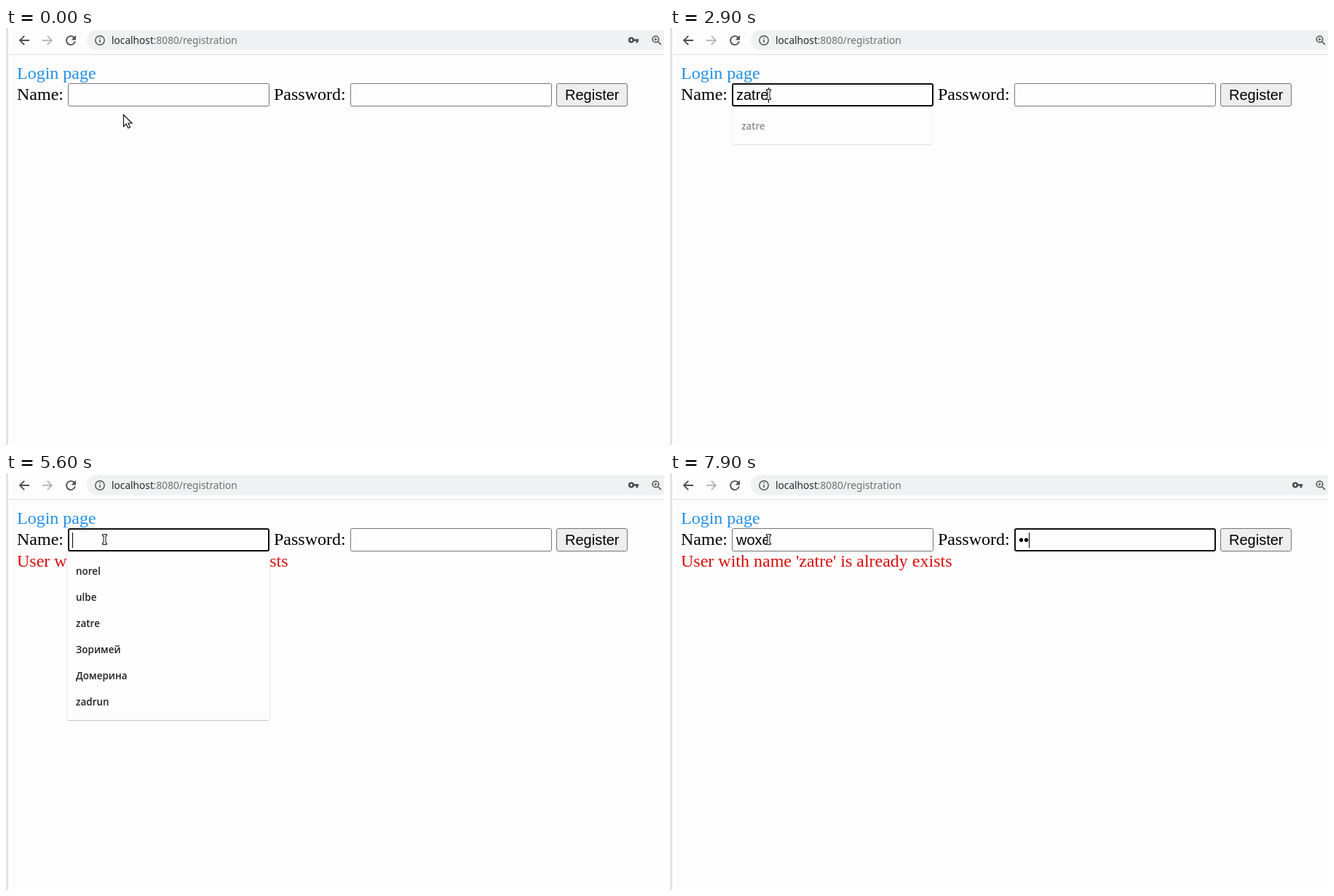
Recreate the animation shown at these times as an HTML page. Size 904 px wide and 574 px high, loop 8000 ms.

```html
<!DOCTYPE html>
<html lang="en">
<head>
<meta charset="utf-8">
<title>Registration form</title>
<style>
  html, body { margin: 0; width: 100%; height: 100%; overflow: hidden; background: #fdfdfd; }
  svg { display: block; width: 904px; height: 574px; }
  .serif { font: 24px "Liberation Serif", serif; }
  .sans { font: 20px "Liberation Sans", sans-serif; }
  .ui { font: 13.7px "Noto Sans", sans-serif; }
  .item { font: 600 13.5px "Open Sans", sans-serif; fill: #222224; }
  .icon { fill: none; stroke: #4f5054; stroke-width: 1.9; }
  .field { fill: #fdfdfd; stroke: #76767a; stroke-width: 1; }
  .field.on { stroke: #101010; stroke-width: 2; }
</style>
</head>
<body>
<svg viewBox="0 0 904 574">
  <rect width="904" height="574" fill="#fdfdfd"/>
  <rect width="3" height="574" fill="#e2e2e2"/>

  <!-- toolbar -->
  <rect x="3" y="36" width="901" height="1" fill="#dedee0"/>
  <rect x="111" y="3" width="820" height="27.5" rx="13.75" fill="#f0f1f2"/>
  <path class="icon" d="M32 17H19.5M25.2 10.8 19 17l6.2 6.2"/>
  <path class="icon" style="stroke:#b8b9bb" d="M50 17h12.5M56.8 10.8 63 17l-6.2 6.2"/>
  <path class="icon" d="M93.6 13.2A6 6 0 1 0 94.9 18.4"/>
  <path d="M96 10v6.4h-6.4z" fill="#4f5054"/>
  <circle class="icon" cx="129" cy="17" r="6.2" style="stroke-width:1.4"/>
  <path class="icon" style="stroke-width:1.5" d="M129 16v4.3M129 13.2v1.6"/>
  <text class="ui" x="145" y="22" fill="#6e7074"><tspan fill="#28292c">localhost</tspan>:8080/registration</text>
  <g id="key">
    <circle class="icon" cx="859" cy="16.6" r="2.8" style="stroke-width:2.6"/>
    <path d="M862 15.3h7.3v2.6h-1v2.6h-2.7v-2.6H862z" fill="#4f5054"/>
  </g>
  <circle class="icon" cx="892.5" cy="15.5" r="4.3" style="stroke-width:1.5"/>
  <path class="icon" style="stroke-width:1.6" d="M895.7 18.7 900 23"/>
  <path class="icon" style="stroke-width:1" d="M890.3 15.5h4.4M892.5 13.3v4.4"/>

  <!-- form -->
  <g class="serif">
    <text x="15" y="70" fill="#2490e8">Login page</text>
    <text x="15" y="99">Name:</text>
    <text x="368" y="99">Password:</text>
    <text id="error" x="15" y="129" fill="#d80c0c">User with name 'zatre' is already exists</text>
  </g>
  <rect id="nameBox" class="field" y="76.5" height="31" rx="2"/>
  <rect id="passBox" class="field" y="76.5" height="31" rx="2"/>
  <text id="nameText" class="sans" x="91" y="99"></text>
  <text id="passText" class="sans" x="479" y="99"></text>
  <rect id="caret" y="82" width="1" height="21"/>
  <rect x="756.5" y="76.5" width="97" height="31" rx="2.5" fill="#eeeeef" stroke="#76767a"/>
  <text class="sans" x="768" y="99">Register</text>

  <!-- suggestions -->
  <g id="popup">
    <rect id="sheet" x="83.5" y="108.5" width="279" fill="#fdfdfd" stroke="#e9e9ea"/>
    <rect id="edge" x="85" width="276" height="1" fill="#c6c6c8"/>
    <g id="items"></g>
  </g>

  <!-- pointers -->
  <path id="arrow" d="M.5.5v16l3.7-3.5 2.5 5.8 2.8-1.2-2.5-5.6h5z" fill="#fff" stroke="#111" stroke-width="1.2"/>
  <path id="beam" d="M-2.5-6.5h6v2h-1.5v10h1.5v2h-6v-2h1.5v-10h-1.5z" fill="#fff" stroke="#111"/>
</svg>

<script>
const LOOP = 8000, STEP = 100, BLINK = 500;
const NAMES = ['norel', 'ulbe', 'zatre', 'Зоримей', 'Домерина', 'zadrun'];
const $ = id => document.getElementById(id);
const set = (id, attrs) => {
  for (const k in attrs) $(id).setAttribute(k, attrs[k]);
};
const show = (id, on) => set(id, { visibility: on ? 'visible' : 'hidden' });

// Each entry changes part of the form at its time in ms.
const EVENTS = [
  [0, { name: '', pass: '', focus: '', key: true, error: false, fade: 0 }],
  [800, { focus: 'name' }],
  [900, { fade: .5 }],
  [1000, { fade: 1 }],
  [1900, { name: 'z', key: false }],
  [2100, { name: 'za' }],
  [2300, { name: 'zat' }],
  [2500, { name: 'zatr' }],
  [2700, { name: 'zatre' }],
  [2900, { fade: .5 }],
  [3000, { fade: 0 }],
  [3100, { focus: 'pass', key: true }],
  [3200, { pass: '•' }],
  [3300, { pass: '••' }],
  [3500, { pass: '•••' }],
  [3600, { pass: '••••' }],
  [3800, { name: '', pass: '', focus: '', error: true }],
  [5300, { focus: 'name' }],
  [5400, { fade: .5 }],
  [5500, { fade: 1 }],
  [5900, { name: 'w', key: false }],
  [6100, { name: 'wo' }],
  [6300, { name: 'wox' }],
  [6600, { name: 'woxe', fade: 0 }],
  [7200, { focus: 'pass', key: true }],
  [7700, { pass: '•' }],
  [7900, { pass: '••' }],
];

function stateAt(t) {
  const s = { typed: 0 };
  for (const [at, change] of EVENTS) {
    if (at > t) break;
    Object.assign(s, change);
    if ('name' in change || 'pass' in change || 'focus' in change) s.typed = at;
  }
  return s;
}

function drawField(id, x, text, focused) {
  const grow = focused ? .5 : 0;
  $(id + 'Text').textContent = text;
  $(id + 'Box').classList.toggle('on', focused);
  set(id + 'Box', { x: x + .5 + grow, y: 76.5 + grow, width: 276 - 2 * grow, height: 31 - 2 * grow });
}

function drawPopup({ name, fade }) {
  const rows = NAMES.filter(n => n.startsWith(name));
  const on = fade > 0 && rows.length > 0;
  show('popup', on);
  if (!on) return;
  const height = rows.length * 36 + 16;
  const scale = .966 + .034 * fade;
  set('sheet', { height });
  set('edge', { y: 108 + height });
  set('popup', {
    opacity: fade,
    transform: `translate(223 109) scale(${scale} 1) translate(-223 -109)`,
  });
  $('items').innerHTML = rows
    .map((n, i) => `<text class="item" x="96" y="${140 + 36 * i}">${n}</text>`)
    .join('');
}

function drawPointer(t) {
  const p = Math.min(1, t / 700);
  const ease = p * p * (3 - 2 * p);
  const x = Math.round(161 - 26 * ease), y = Math.round(119 - 28 * ease);
  const inside = y < 108;
  const transform = `translate(${x} ${y})`;
  set('arrow', { transform });
  set('beam', { transform });
  show('arrow', !inside);
  show('beam', inside);
}

function draw(t) {
  const s = stateAt(t);
  show('key', s.key);
  show('error', s.error);
  drawField('name', 85, s.name, s.focus === 'name');
  drawField('pass', 473, s.pass, s.focus === 'pass');
  const lit = s.focus && Math.floor((t - s.typed) / BLINK) % 2 === 0;
  show('caret', lit);
  if (lit) {
    const text = $(s.focus + 'Text');
    const width = s[s.focus] ? text.getComputedTextLength() : 0;
    set('caret', { x: Math.round(+text.getAttribute('x') + width) });
  }
  drawPopup(s);
  drawPointer(t);
}

const start = performance.now();
let last = -1;
function tick() {
  const t = Math.floor(((performance.now() - start) % LOOP) / STEP) * STEP;
  if (t !== last) draw(last = t);
  requestAnimationFrame(tick);
}
tick();
</script>
</body>
</html>
```
